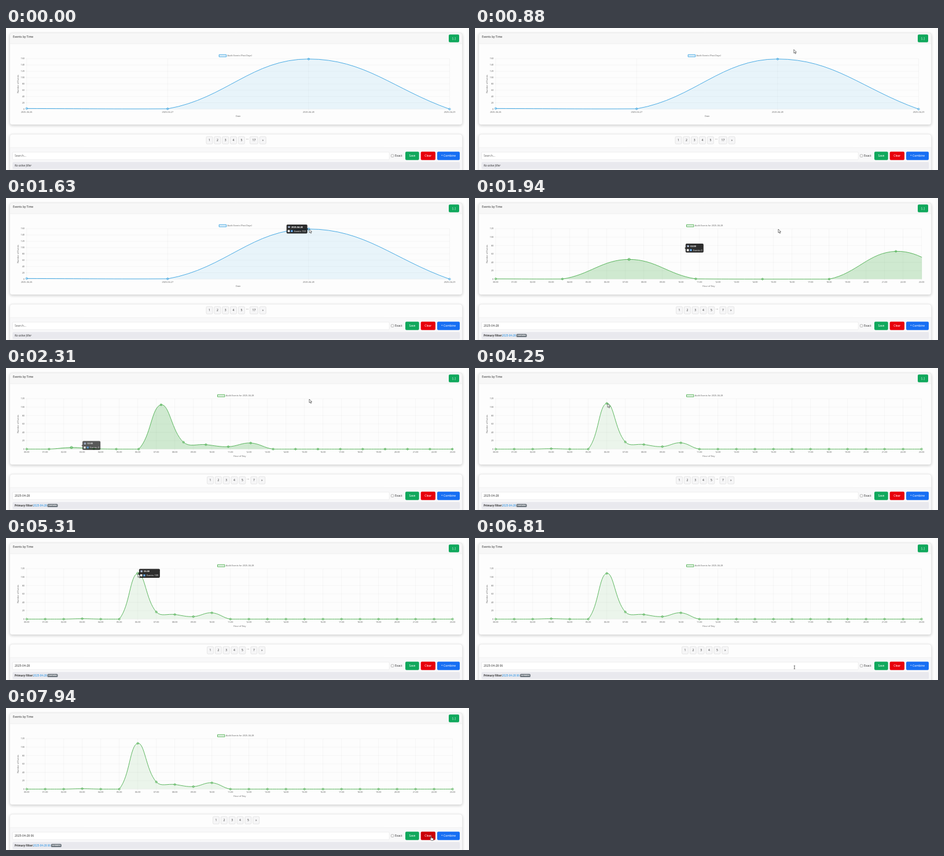
Recreate the animation shown at these times as an HTML page with a canvas. Size 800 px wide and 246 px high, loop 8 s.

```html
<!DOCTYPE html>
<html lang="en">
<head>
<meta charset="utf-8">
<title>Events by Time</title>
<style>
html, body { margin: 0; width: 800px; height: 246px; overflow: hidden; background: #fdfdfd; }
canvas { display: block; width: 800px; height: 246px; }
</style>
</head>
<body>
<canvas id="stage"></canvas>
<script>
const LOOP = 8000, DRILL = 1733, MORPH = 1000, PICK_HOUR = 5850;
const HOVER_DAY = [1200, 2430], HOVER_HOUR = [4300, 5850];
const LEFT = 35.7, TOP = 53.2, BOTTOM = 140.5, DAY_STEP = 243.6, HOUR_STEP = 32;
const BLUE = '54,162,225', GREEN = '76,175,80';
const SANS = '"Noto Sans", "Open Sans", sans-serif';

const canvas = document.getElementById('stage');
const ctx = canvas.getContext('2d');
const ratio = window.devicePixelRatio || 1;
canvas.width = 800 * ratio;
canvas.height = 246 * ratio;

const clamp = v => Math.max(0, Math.min(1, v));
const mix = (a, b, k) => a + (b - a) * k;
const smooth = k => k * k * (3 - 2 * k);
const pad = n => String(n).padStart(2, '0');
const valueY = (value, max) => BOTTOM - value / max * (BOTTOM - TOP);

const dayLabels = [26, 27, 28, 29].map(d => '2025-04-' + d);
const hourLabels = Array.from({ length: 24 }, (_, h) => pad(h) + ':00');
const hourValues = Array(24).fill(0);
Object.assign(hourValues, { 3: 1, 6: 109, 7: 17, 8: 11, 9: 6, 10: 15 });
const dayPoints = [2, 1, 159, 0].map((v, i) => ({ x: LEFT + i * DAY_STEP, y: valueY(v, 160) }));

// [time, x, y]
const cursorPath = [
  [480, 600, 7], [1150, 524, 54], [2600, 524, 54], [2940, 517, 56], [4300, 228, 62],
  [5750, 228, 62], [6650, 552, 224], [6950, 552, 224], [7600, 734, 222], [8000, 734, 222]
];

function text(str, x, y, { size = 5, color = '#333', align = 'left', style = '' } = {}) {
  ctx.font = `${style} ${size}px ${SANS}`;
  ctx.fillStyle = color;
  ctx.textAlign = align;
  ctx.textBaseline = 'middle';
  ctx.fillText(str, x, y);
}

function box(x, y, w, h, fill, stroke, radius = 0, lineWidth = 0.5) {
  ctx.beginPath();
  ctx.roundRect(x, y, w, h, radius);
  if (fill) { ctx.fillStyle = fill; ctx.fill(); }
  if (stroke) { ctx.strokeStyle = stroke; ctx.lineWidth = lineWidth; ctx.stroke(); }
}

function line(x1, y1, x2, y2, color, width = 0.5) {
  ctx.beginPath();
  ctx.moveTo(x1, y1);
  ctx.lineTo(x2, y2);
  ctx.strokeStyle = color;
  ctx.lineWidth = width;
  ctx.stroke();
}

function card(y, h, headerHeight, headerFill, bodyFill) {
  ctx.save();
  ctx.shadowColor = 'rgba(0,0,0,.2)';
  ctx.shadowBlur = 5 * ratio;
  ctx.shadowOffsetY = 1.5 * ratio;
  box(6.5, y, 782, h, bodyFill, null, 4);
  ctx.restore();
  box(6.5, y, 782, headerHeight, headerFill, null, [4, 4, 0, 0]);
  line(6.5, y + headerHeight, 788.5, y + headerHeight, '#e4e4e4');
  box(6.5, y, 782, h, null, '#dcdcdc', 4);
}

function button(label, x, w, color) {
  box(x, 214.3, w, 14.4, color, null, 2);
  text(label, x + w / 2, 221.8, { color: '#fff', align: 'center' });
}

function pagination(labels) {
  const GAP = 2.85;
  const width = s => s === '...' ? 3.3 : s.length > 1 ? 14 : 11;
  let x = 397.6 - labels.reduce((sum, s) => sum + width(s) + GAP, -GAP) / 2;
  for (const s of labels) {
    const w = width(s);
    if (s === '...') text(s, x + w / 2, 191.6, { align: 'center' });
    else {
      box(x, 188, w, 13, '#f6f6f7', '#d2d2d2', 2);
      text(s, x + w / 2, 194.8, { align: 'center' });
    }
    x += w + GAP;
  }
}

function axes(labels, step, max, title) {
  const grid = 'rgba(0,0,0,.075)', small = { size: 3.75, color: '#666' };
  const right = LEFT + step * (labels.length - 1);
  for (let v = 0; v <= max; v += 20) {
    const y = valueY(v, max);
    line(LEFT - 2.5, y, right, y, grid);
    text(v, 32, y + 0.2, { ...small, align: 'right' });
  }
  labels.forEach((label, i) => {
    const x = LEFT + i * step;
    line(x, TOP, x, BOTTOM + 2.5, grid);
    text(label, x, 146.2, { ...small, align: 'center' });
  });
  text(title, (LEFT + right) / 2, 153.3, { ...small, align: 'center' });
  ctx.save();
  ctx.translate(20.8, 97);
  ctx.rotate(-Math.PI / 2);
  text('Number of Events', 0, 0, { ...small, align: 'center' });
  ctx.restore();
}

// Distance-weighted spline handles, kept inside the plot vertically.
function handles(points, i) {
  const p = points[i], a = points[i - 1] || p, b = points[i + 1] || p;
  const da = Math.hypot(p.x - a.x, p.y - a.y), db = Math.hypot(b.x - p.x, b.y - p.y);
  const at = k => ({
    x: p.x + k * (b.x - a.x),
    y: Math.max(TOP, Math.min(BOTTOM, p.y + k * (b.y - a.y)))
  });
  return { before: at(-0.4 * da / (da + db)), after: at(0.4 * db / (da + db)) };
}

function trace(points) {
  ctx.beginPath();
  ctx.moveTo(points[0].x, points[0].y);
  for (let i = 1; i < points.length; i++) {
    const c1 = handles(points, i - 1).after, c2 = handles(points, i).before;
    ctx.bezierCurveTo(c1.x, c1.y, c2.x, c2.y, points[i].x, points[i].y);
  }
}

function plot(points, right, rgb, alpha, activeIndex) {
  ctx.save();
  ctx.beginPath();
  ctx.rect(LEFT - 0.5, TOP - 0.5, right - LEFT + 1, BOTTOM - TOP + 1);
  ctx.clip();
  trace(points);
  ctx.lineTo(points.at(-1).x, BOTTOM);
  ctx.lineTo(points[0].x, BOTTOM);
  ctx.fillStyle = `rgba(${rgb},${alpha})`;
  ctx.fill();
  trace(points);
  ctx.strokeStyle = `rgb(${rgb})`;
  ctx.lineWidth = 0.9;
  ctx.stroke();
  ctx.restore();
  points.forEach((p, i) => {
    if (p.x > right + 1.5) return;
    ctx.beginPath();
    ctx.arc(p.x, p.y, i === activeIndex ? 2 : 1.6, 0, 7);
    ctx.fillStyle = `rgba(${rgb},${alpha})`;
    ctx.fill();
    ctx.strokeStyle = `rgb(${rgb})`;
    ctx.lineWidth = 0.8;
    ctx.stroke();
  });
}

function legend(label, x, rgb) {
  box(x, 46.2, 12.5, 3.75, `rgba(${rgb},.12)`, `rgb(${rgb})`, 0, 0.9);
  text(label, x + 14.4, 48.2, { size: 3.75, color: '#666' });
}

function tooltip(point, title, value, w, opacity) {
  if (opacity <= 0) return;
  const side = point.x < 400 ? 1 : -1, h = 15.4;
  const x = side > 0 ? point.x + 2.2 : point.x - 2.2 - w, y = point.y - h / 2;
  const edge = point.x + side * 2.2;
  ctx.save();
  ctx.globalAlpha = opacity;
  box(x, y, w, h, 'rgba(0,0,0,.82)', null, 1.8);
  ctx.beginPath();
  ctx.moveTo(edge, point.y - 1.6);
  ctx.lineTo(edge - side * 1.6, point.y);
  ctx.lineTo(edge, point.y + 1.6);
  ctx.fillStyle = 'rgba(0,0,0,.82)';
  ctx.fill();
  box(x + 2.6, y + 2.6, 3.4, 3.2, '#b9c4d8', null, 0.5);
  line(x + 2.6, y + 3.5, x + 6, y + 3.5, '#6f86b8', 0.7);
  text(title, x + 8.4, y + 4.5, { size: 3.75, color: '#fff', style: 'bold' });
  box(x + 2, y + 9.4, 3.6, 3.6, '#fff', null);
  box(x + 7.3, y + 9.4, 3.6, 3.6, '#4d94d8', null, 0.6);
  line(x + 8.2, y + 11.2, x + 10, y + 11.2, '#d8ebff', 0.8);
  text('Events: ' + value, x + 13.2, y + 11.4, { size: 3.75, color: '#fff' });
  ctx.restore();
}

function hourPoints(time) {
  const rest = (1 - clamp((time - DRILL) / MORPH)) ** 4;
  return hourValues.map((v, i) => ({
    x: LEFT + i * mix(HOUR_STEP, DAY_STEP, rest),
    y: mix(valueY(v, 120), i < 4 ? dayPoints[i].y : BOTTOM, rest)
  }));
}

const fade = (time, [start, end]) => clamp((time - start) / 150) * clamp((end - time) / 150);

function chart(time) {
  const dayFade = fade(time, HOVER_DAY);
  if (time < DRILL) {
    axes(dayLabels, DAY_STEP, 160, 'Date');
    legend('Audit Events (Past Days)', 368.2, BLUE);
    plot(dayPoints, dayPoints[3].x, BLUE, 0.1, dayFade > 0 ? 2 : -1);
    tooltip(dayPoints[2], dayLabels[2], 159, 36, dayFade);
    return;
  }
  const points = hourPoints(time), hourFade = fade(time, HOVER_HOUR);
  const active = dayFade > 0 ? 2 : hourFade > 0 ? 6 : -1;
  axes(hourLabels, HOUR_STEP, 120, 'Hour of Day');
  legend('Audit Events for 2025-04-28', 365.5, GREEN);
  plot(points, LEFT + 23 * HOUR_STEP, GREEN, mix(0.26, 0.1, clamp((time - 2400) / 250)), active);
  tooltip(hourPoints(time - 95)[2], hourLabels[2], 0, 31, dayFade);
  tooltip(points[6], hourLabels[6], 109, 36, hourFade);
}

function controls(time, clearHover) {
  const query = time < DRILL ? '' : time < PICK_HOUR ? '2025-04-28' : '2025-04-28 06';
  pagination(!query ? ['1', '2', '3', '4', '5', '...', '17', '»']
    : time < PICK_HOUR ? ['1', '2', '3', '4', '5', '...', '7', '»']
    : ['1', '2', '3', '4', '5', '»']);
  box(11.3, 215, 651, 13, '#fff', '#dcdcdc', 1.5);
  text(query || 'Search...', 15, 221.8, { color: query ? '#333' : '#666' });
  box(665.5, 219.2, 4.3, 4.3, '#fff', '#777', 0.8);
  text('Exact', 672, 221.8);
  button('Save', 690, 23.7, '#10a85c');
  button('Clear', 716.7, 25.3, clearHover ? '#cb0008' : '#e8000b');
  button('+ Combine', 745, 39, '#176ff3');
  box(11.3, 232.3, 773, 12, '#e9e9ee', null, 1.5);
  if (!query) {
    text('No active filter', 15, 238.4, { size: 4.5, style: 'italic' });
    return;
  }
  text('Primary Filter:', 15, 238.4, { size: 4.5, style: 'bold' });
  text(query, 47, 238.4, { size: 4.5, color: '#1c8fe8' });
  const x = 48 + ctx.measureText(query).width;
  box(x, 235.5, 18, 5.6, '#6c757d', null, 1.6);
  text('contains', x + 9, 238.4, { size: 3.4, color: '#fff', style: 'bold', align: 'center' });
}

function cursorAt(time) {
  if (time < cursorPath[0][0]) return null;
  const i = cursorPath.findIndex(([t]) => t > time);
  const [t0, x0, y0] = cursorPath[i - 1], [t1, x1, y1] = cursorPath[i];
  const k = smooth((time - t0) / (t1 - t0));
  const x = mix(x0, x1, k), y = mix(y0, y1, k);
  const shape = y < 214 ? 'arrow' : x < 663 ? 'beam' : x > 690 ? 'hand' : 'arrow';
  return { x, y, shape };
}

const arrowShape = new Path2D('M0 0V6.2L1.5 4.9L2.6 7.3L3.6 6.8L2.6 4.5H4.5Z');
const handShape = new Path2D('M0 .4Q.7-.4 1.2.5V3L4 3.6Q4.9 3.9 4.7 5L4.2 7.4H.6L-1.6 4.6Q-1.6 3.6-.7 4L0 4.6Z');

function drawCursor({ x, y, shape }) {
  ctx.save();
  ctx.translate(x, y);
  if (shape === 'beam') {
    line(0, -2.6, 0, 2.6, '#222', 0.7);
    line(-1.2, -2.7, 1.2, -2.7, '#222', 0.6);
    line(-1.2, 2.7, 1.2, 2.7, '#222', 0.6);
  } else {
    const path = shape === 'hand' ? handShape : arrowShape;
    ctx.fillStyle = '#fff';
    ctx.fill(path);
    ctx.strokeStyle = '#222';
    ctx.lineWidth = 0.6;
    ctx.stroke(path);
  }
  ctx.restore();
}

function draw(time) {
  const cursor = cursorAt(time);
  ctx.setTransform(ratio, 0, 0, ratio, 0, 0);
  box(0, 0, 800, 246, '#fdfdfd');
  box(795.5, 0, 4.5, 246, '#f9f9f9');
  card(8.5, 159, 18.7, '#f7f7f7', '#fdfdfd');
  text('Events by Time', 12, 15.8);
  box(765, 11.3, 18, 13.4, '#10a85c', null, 2);
  text('[↓]', 774, 18.2, { size: 4.6, color: '#fff', align: 'center' });
  card(184, 75, 23.3, '#fdfdfd', '#f8f8f9');
  chart(time);
  controls(time, cursor?.shape === 'hand' && cursor.x > 717);
  if (cursor) drawCursor(cursor);
}

const start = performance.now();
function tick() {
  draw((performance.now() - start) % LOOP);
  requestAnimationFrame(tick);
}
tick();
</script>
</body>
</html>
```
